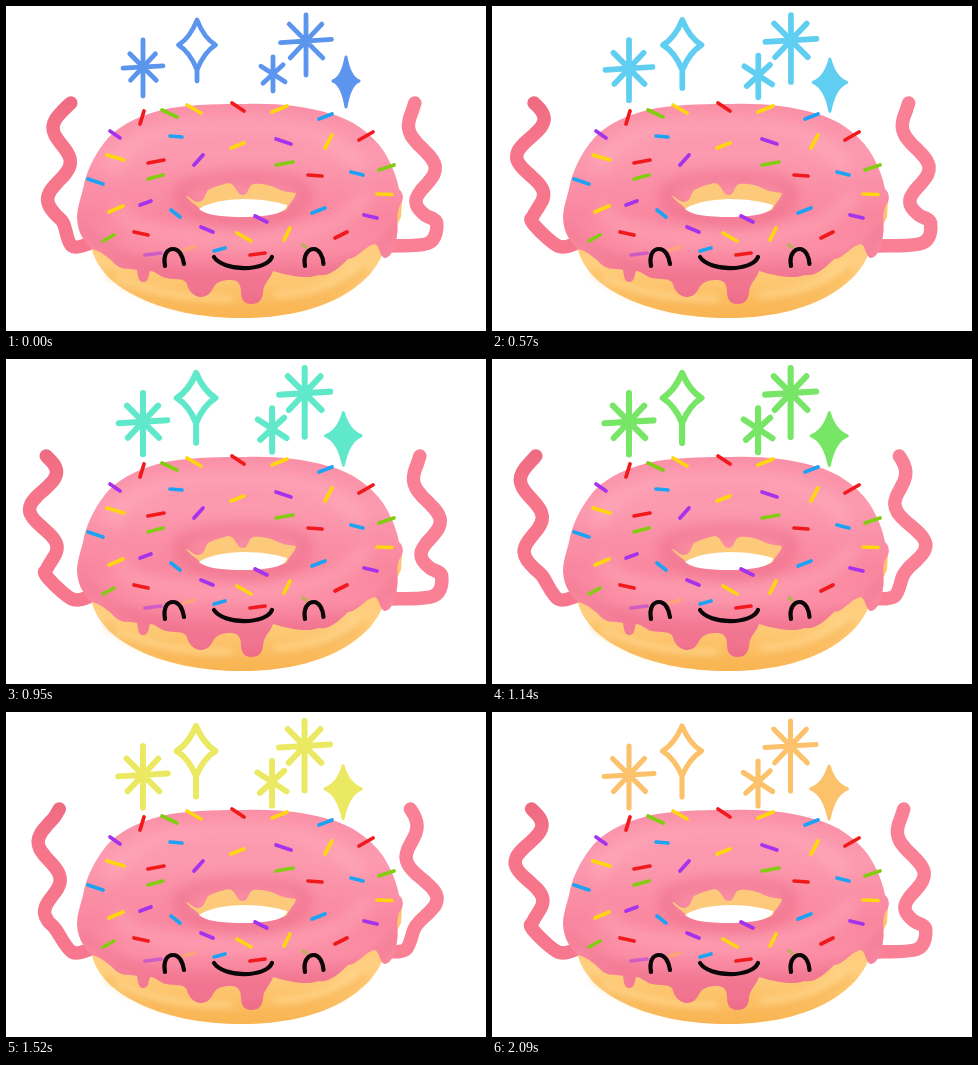
These frames come from a looping animation (480x325 px, 2280 ms). An HTML page:

```html
<!DOCTYPE html>
<html lang="en">
<head>
<meta charset="utf-8">
<title>Happy donut</title>
<style>
html, body { margin: 0; width: 100%; height: 100%; overflow: hidden; background: #fff; }
svg { display: block; width: 100vw; height: 100vh; }
.line { fill: none; stroke-linecap: round; stroke-linejoin: round; }
</style>
</head>
<body>
<svg viewBox="0 0 480 325">
  <defs>
    <linearGradient id="icing" x1="0" y1="0" x2="0" y2="1">
      <stop offset="0" stop-color="#fa8fa6"/>
      <stop offset=".25" stop-color="#fc9aaf"/>
      <stop offset=".55" stop-color="#f9879f"/>
      <stop offset=".72" stop-color="#fb8ea5"/>
      <stop offset="1" stop-color="#ee6c89"/>
    </linearGradient>
    <linearGradient id="dough" x1="0" y1="0" x2="0" y2="1">
      <stop offset="0" stop-color="#fdc26b"/>
      <stop offset=".55" stop-color="#ffcf80"/>
      <stop offset="1" stop-color="#f9b451"/>
    </linearGradient>
    <linearGradient id="armShade" gradientUnits="userSpaceOnUse" x1="0" y1="95" x2="0" y2="245">
      <stop offset="0" stop-color="#ef6b82"/>
      <stop offset=".25" stop-color="#f6758a"/>
      <stop offset="1" stop-color="#f7778e"/>
    </linearGradient>
    <filter id="soft" x="-40%" y="-60%" width="180%" height="220%"><feGaussianBlur stdDeviation="7"/></filter>
    <filter id="softer" x="-20%" y="-60%" width="140%" height="220%"><feGaussianBlur stdDeviation="3"/></filter>
    <path id="glaze" d="M71 212C71 200 76 190 78 178C82 161 91 145 102 132C116 117 139 107 165 102C190 98 218 98 240 98C268 97 298 100 322 107C346 113 365 127 377 144C386 158 391 172 393 183C398 187 398 195 394 199C389 208 393 220 391 229C390 239 386 251 379 252C373 251 374 238 368 238C358 241 352 252 342 253C333 262 323 271 312 269C301 274 281 269 267 265C265 272 257 278 257 287C256 295 252 298 245 298C238 298 235 293 235 286C235 278 232 274 225 274C217 274 211 275 207 282C204 289 199 291 194 291C187 290 182 284 181 278C178 271 168 274 160 272C154 271 150 265 144 265C142 270 143 276 137 276C132 276 132 269 131 264C126 262 117 265 110 259C103 252 95 245 86 243C79 236 72 229 71 212Z"/>
    <clipPath id="glazeClip"><use href="#glaze"/></clipPath>
  </defs>

  <g class="line" stroke-width="13.5">
    <path id="left" stroke="url(#armShade)"/>
    <path id="right" stroke="#fa8096"/>
  </g>

  <path d="M85 239C88 258 102 275 126 288C157 305 197 312 236 312C274 312 312 305 341 287C360 275 371 262 377 247L395 211L396 194L360 190L110 215Z" fill="url(#dough)"/>
  <g fill="none" filter="url(#softer)">
    <path d="M100 266C145 300 186 302 236 304C289 303 330 290 360 264" stroke="#f7b24f" stroke-width="5" opacity=".55"/>
    <path d="M110 272C155 290 190 293 226 293M268 289C310 286 334 275 352 259" stroke="#ffd992" stroke-width="6" opacity=".7"/>
  </g>

  <use href="#glaze" fill="url(#icing)"/>
  <g clip-path="url(#glazeClip)">
    <g class="line" filter="url(#soft)">
      <path d="M107 160C130 119 185 119 236 120C290 118 330 128 352 160" stroke="#ffb0c0" stroke-width="16" opacity=".55"/>
      <path d="M112 205C128 229 180 231 238 233C290 232 340 220 358 193" stroke="#ffabbc" stroke-width="15" opacity=".55"/>
      <path d="M172 186C182 168 292 166 300 184C298 206 276 216 238 217C200 215 174 204 172 186Z" stroke="#e9637f" stroke-width="9" opacity=".65"/>
      <path d="M74 222C100 249 132 258 165 268C210 274 280 272 330 264C360 254 380 243 392 222" stroke="#ea6482" stroke-width="9" opacity=".55"/>
    </g>
  </g>

  <path d="M180 190C184 190 186 196 192 196C199 196 199 187 202 184C210 180 215 179 222 177C230 177 230 189 237 189C243 189 242 178 248 178C255 177 262 179 268 181C273 184 279 186 290 187C289 193 283 197 281 203C270 212 205 213 194 203C190 198 184 196 180 190Z" fill="#fcca7a"/>
  <path d="M193 203C200 198 213 194 237 193C257 193 271 196 281 199C281 207 262 211 238 211C214 211 200 209 193 203Z" fill="#fff"/>

  <g class="line" stroke-width="3.7">
    <path stroke="#f01a1d" d="M134 118l4-13M226 97l12 8M353 134l14-8M142 157l16-3M302 169l14 1M329 232l12-6M128 226l14 3M244 249l15-2"/>
    <path stroke="#83cc12" d="M156 104l15 7M142 173l15-4M270 159l17-3M373 164l15-5M97 235l11-6"/>
    <path stroke="#ffd60f" d="M181 99l14 8M266 106l15-6M225 142l13-5M319 142l7-13M101 149l17 5M371 188l15 .5M103 206l14-6M278 234l6-12M231 227l14 8"/>
    <path stroke="#1ea2f3" d="M313 113l13-5M164 130l12 1M345 166l12 3M82 173l15 5M165 204l9 7M306 207l13-5M208 245l11-3"/>
    <path stroke="#a532ec" d="M104 125l10 7M270 133l15 5M188 159l9-10M134 199l11-4M195 221l12 5M249 210l12 6M358 209l13 3"/>
    <g opacity=".5">
      <path stroke="#a532ec" d="M139 249l16-2"/>
      <path stroke="#ffb84a" d="M178 244l10-3"/>
      <path stroke="#83cc12" d="M297 239l3 2"/>
    </g>
  </g>
  <path class="line" stroke="#0b0708" stroke-width="4.2" d="M159 260C157 249 161 243 167 243C173 243 177 250 178 258M299 260C297 249 302 243 308 243C313 243 317 250 317.500 258M208 251C217 265.500 260 266 266 251"/>

  <g id="stars" class="line"></g>
</svg>
<script>
const STEP = 190, COUNT = 12, TAU = 2 * Math.PI;
const WAVE = 75, TOP = 97, BOTTOM = 217;
const COLORS = ["#5b95ee", "#5fcef1", "#5fe9ca", "#77e565", "#ebe961"];
const LAST_COLOR = "#fcc26b";
const $ = id => document.getElementById(id);

// Smooth curve through points
const curve = pts => {
  const at = i => pts[Math.max(0, Math.min(pts.length - 1, i))];
  let d = `M${at(0)}`;
  for (let i = 0; i < pts.length - 1; i++) {
    const [a, b, c, e] = [at(i - 1), at(i), at(i + 1), at(i + 2)];
    const c1 = b.map((v, k) => v + (c[k] - a[k]) / 6);
    const c2 = c.map((v, k) => v - (e[k] - b[k]) / 6);
    d += `C${c1} ${c2} ${c}`;
  }
  return d;
};

// A cosine wave around a spine; u runs from hand (0) towards shoulder (1)
const wave = (spine, amp, crest) => {
  const pts = [];
  for (let y = TOP; y <= BOTTOM; y += 8) {
    const u = (y - TOP) / 140;
    pts.push([spine(u) + amp(u) * Math.cos(TAU * (y - crest) / WAVE), y]);
  }
  return pts;
};

// Every other step flips the wave; a first lean settles and a slow sway remains
function leftArm(step) {
  const flipped = step % 2, settle = Math.exp(-step / 1.5), sway = Math.cos(TAU * step / 4);
  const center = flipped ? 36.5 : 41 + 2 * sway;
  const size = flipped ? 13.5 : 11;
  const crest = flipped ? 188 : 163 + 4.5 * sway - 10 * settle;
  const pts = wave(
    u => center + 18 * settle * (1 - u) + 25 * u ** 6,
    u => size * (1 - u ** 6),
    crest
  );
  return curve([...pts, [66, 240], [85, 237]]);
}

function rightArm(step) {
  const flipped = step % 2, settle = Math.exp(-step / 1.5);
  const shift = 4 * Math.cos(TAU * (step - 2.5) / COUNT) + 5 * flipped;
  const crest = flipped ? 159 : 184 - 25 * settle;
  const pts = wave(u => 405 + shift + 26 * u, u => 6 + 12 * u, crest);
  const elbow = pts[pts.length - 1][0] - 8;
  return curve([...pts, [elbow, 237], [384, 240]]);
}

const spoke = (x, y, dx, dy) => `M${x - dx} ${y - dy}L${x + dx} ${y + dy}`;
const pole = ({ x, top, bottom }) => `M${x} ${top}V${bottom}`;
const burst = s => pole(s) + spoke(s.x, s.y, s.r, -s.r * .06) +
  spoke(s.x, s.y, s.r * .66, s.r * .66) + spoke(s.x, s.y, s.r * .62, -s.r * .66);
const sixRays = s => pole(s) + spoke(s.x, s.y, s.r * .86, s.r * .56) + spoke(s.x, s.y, s.r * .72, -s.r * .66);
const diamond = ({ x, y, top, bottom, r }, pinch) => {
  const q = r * pinch;
  return `M${x} ${top}Q${x + q} ${y - q} ${x + r} ${y}Q${x + q} ${y + q} ${x} ${bottom}` +
    `Q${x - q} ${y + q} ${x - r} ${y}Q${x - q} ${y - q} ${x} ${top}Z`;
};
const hollow = s => diamond({ ...s, bottom: s.y + 25 }, .38) + pole({ x: s.x, top: s.y + 25, bottom: s.bottom });
const solid = s => diamond(s, .28);

// Each star has a first pose and the amount it grows by
const stars = [
  { shape: burst, from: { x: 137, y: 61, top: 34, bottom: 90, r: 20 }, grow: { y: 2, bottom: 6, r: 5 } },
  { shape: hollow, from: { x: 191, y: 39, top: 14, bottom: 75, r: 18.5 }, grow: { x: -1, bottom: 10, r: 1 } },
  { shape: sixRays, from: { x: 267, y: 68, top: 51, bottom: 85, r: 14 }, grow: { x: -1, y: 2, top: -2, bottom: 9, r: 3 } },
  { shape: burst, from: { x: 300, y: 35, top: 9, bottom: 69, r: 25.5 }, grow: { x: -1.5, y: -1, bottom: 10 } },
  { shape: solid, from: { x: 340, y: 75, top: 51, bottom: 101, r: 13 }, grow: { x: -3, y: 2, top: 3, bottom: 6, r: 5.5 } }
];
for (const star of stars) {
  star.el = $("stars").appendChild(document.createElementNS("http://www.w3.org/2000/svg", "path"));
}

function drawStars(step) {
  const growth = 1 - Math.exp(-step / 2.5);
  const color = step === COUNT - 1 ? LAST_COLOR : COLORS[Math.min(step >> 1, COLORS.length - 1)];
  const width = 4.8 + 1.3 * Math.sin(Math.PI * step / COUNT);
  $("stars").setAttribute("stroke", color);
  for (const { shape, from, grow, el } of stars) {
    const pose = { ...from };
    for (const k in grow) pose[k] += grow[k] * growth;
    el.setAttribute("d", shape(pose));
    el.setAttribute("fill", shape === solid ? color : "none");
    el.setAttribute("stroke-width", shape === solid ? 3 : width);
  }
}

function draw(step) {
  $("left").setAttribute("d", leftArm(step));
  $("right").setAttribute("d", rightArm(step));
  drawStars(step);
}

function tick(now) {
  draw(Math.floor(now / STEP) % COUNT);
  requestAnimationFrame(tick);
}
draw(0);
requestAnimationFrame(tick);
</script>
</body>
</html>
```
